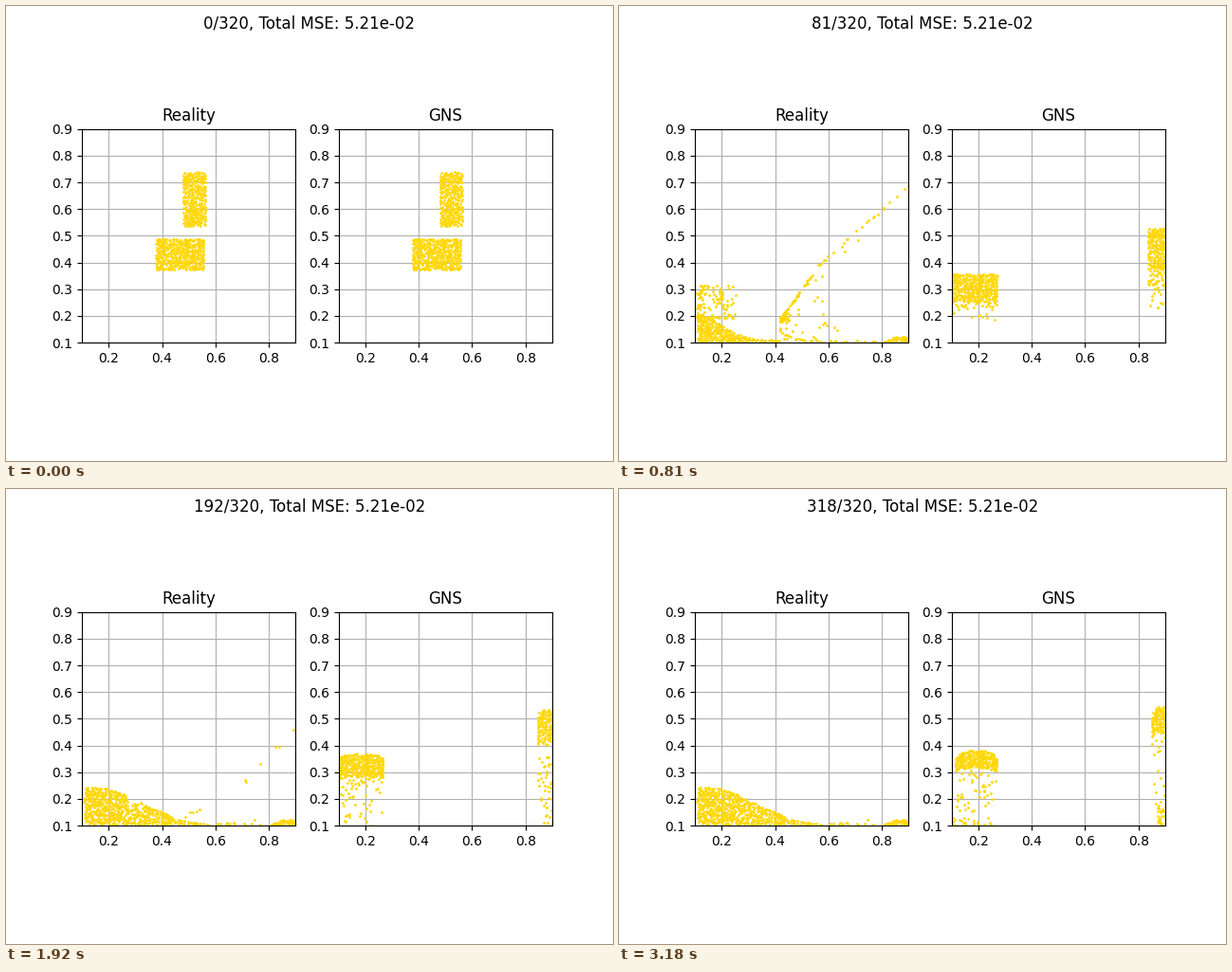
These frames come from a looping animation (640x480 px, 3210 ms). A matplotlib script:

```python
import numpy as np
import matplotlib.pyplot as plt
from matplotlib.animation import FuncAnimation

STEPS, STRIDE, FRAMES = 320, 3, 107
LO, HI = 0.1, 0.9
N_LEFT, N_RIGHT = 320, 245
N_HEAP, N_FLOOR = 32, 30
rng = np.random.default_rng(7)


def ramp(t, a, b):
    return np.clip((t - a) / (b - a), 0, 1)


def ease_out(u):
    return 1 - (1 - u) ** 2


def scatter(n, x0, x1, y0, top, gap=0.0085):
    """Evenly spread random points between y0 and the profile top(x)."""
    peak = top(np.linspace(x0, x1, 50)).max()
    pts = np.empty((n, 2))
    k = 0
    while k < n:
        p = rng.uniform((x0, y0), (x1, peak))
        if p[1] <= top(p[0]) and np.all(((pts[:k] - p) ** 2).sum(1) > gap**2):
            pts[k] = p
            k += 1
        else:
            gap *= 0.9995
    return pts


def block(n, x0, x1, y0, y1):
    return scatter(n, x0, x1, y0, lambda x: y1 + 0 * x)


def by_columns(p, cols=16):
    """Sort points column by column, bottom to top."""
    groups = np.array_split(np.argsort(p[:, 0]), cols)
    return p[np.concatenate([g[np.argsort(p[g, 1])] for g in groups])]


def pile_top(x):
    return LO + 0.145 * np.exp(-(np.maximum(x - LO, 0) / 0.29) ** 2.5)


def splash_top(x):
    return LO + 0.01 + 0.1 * np.exp(-((x - LO) / 0.13) ** 2)


def heap_top(x):
    return 0.124 - 6 * (x - 0.865) ** 2


class Slump:
    """The left block hits its wall, splashes and settles as the pile's base."""

    speed = np.array([-0.0077, -0.0056])
    hit = 36

    def __init__(self, pts, rest):
        self.pts, self.rest = pts, by_columns(rest)
        n_low = int(0.66 * len(pts))
        n_high = len(pts) - n_low
        loose = np.column_stack([0.108 + 0.145 * rng.random(n_high) ** 1.7,
                                 rng.uniform(0.18, 0.315, n_high)])
        low = scatter(n_low, 0.108, 0.42, 0.103, splash_top)
        self.splash = by_columns(np.vstack([low, loose]))

    def at(self, t):
        p = self.pts + self.speed * min(t, self.hit)
        p = p + (self.splash - p) * ramp(t, self.hit, 81)
        return p + (self.rest - p) * ease_out(ramp(t, 81, 130))


class Jet:
    """Grains wait at the right wall, fly back on a straight line and settle."""

    speed = np.array([0.01, -0.0055])

    def __init__(self, pts, slots, n_floor):
        n, m = len(pts), len(slots)
        self.pts = pts
        self.hit = (HI - 0.003 - pts[:, 0]) / self.speed[0]
        # Most leave at once, ever fewer later on.
        self.launch = np.maximum(33 + 160 * rng.random(n) ** 5, self.hit - 6)
        self.launch[m:] = rng.uniform(34, 55, n_floor)
        late = ramp(self.launch, 120, 165)
        stray = (rng.random(n) < 0.45) & (self.launch < 65)
        depth = rng.exponential(np.where(stray, 0.11, 0.006))
        depth[m:] = rng.uniform(0.2, 0.45, n_floor)
        self.slope = 0.873 + 0.127 * late
        self.source = 0.69 - 0.08 * (1 - ramp(self.launch, 33, 48)) - 0.22 * late - depth

        flight = np.arange(0, 80, 0.5)
        x, y = self.path(flight[:, None])
        self.land = flight[np.argmax(y <= pile_top(x), axis=0)]
        self.land_pos = np.column_stack(self.path(self.land))

        # Early grains settle low in the pile.
        self.rest = np.empty((n, 2))
        order = np.argsort((self.launch + self.land)[:m])
        self.rest[order] = slots[np.argsort(slots[:, 1] + rng.normal(0, 0.01, m))]
        self.rest[m:, 0] = rng.uniform(0.47, 0.87, n_floor)
        self.rest[m:, 1] = LO + np.minimum(rng.exponential(0.007, n_floor), 0.02)

    def path(self, s):
        return HI - 0.01 * s, self.source - 0.01 * self.slope * s

    def at(self, t):
        p = self.pts + self.speed * np.minimum(t, self.hit)[:, None]
        wait = ramp(t, self.hit, np.maximum(self.launch, self.hit + 1))
        p[:, 0] += 0.04 * np.minimum(1, (self.launch - 30) / 15) * np.sin(np.pi * wait)
        p[:, 1] += (self.source - p[:, 1]) * wait
        fly = np.column_stack(self.path(np.clip(t - self.launch, 0, self.land)))
        slide = ease_out(ramp(t - self.launch - self.land, 0, 35))
        fly += (self.rest - self.land_pos) * slide[:, None]
        return np.where((t > self.launch)[:, None], fly, p)


class Heap:
    """Grains that drop down along the right wall."""

    def __init__(self, pts):
        self.pts = pts
        self.hit = (HI - 0.003 - pts[:, 0]) / Jet.speed[0]
        self.rest = scatter(len(pts), 0.806, 0.896, 0.1, heap_top, 0.006)

    def at(self, t):
        p = self.pts + Jet.speed * np.minimum(t, self.hit)[:, None]
        drop = ramp(t, self.hit, self.hit + 32)[:, None] ** 1.4
        return p + (self.rest - p) * drop


class Hanger:
    """A block that drifts to a wall, hangs there and sheds grains from below."""

    def __init__(self, pts, shift, tau, drift, squeeze, shed, pace, rest, lift):
        self.pts, self.squeeze, self.lift = pts, squeeze, lift
        self.shift, self.tau, self.drift = map(np.array, (shift, tau, drift))
        self.rest_x, self.rest_y = rest
        low, high = pts.min(0), pts.max(0)
        self.mid = (low[0] + high[0]) / 2
        self.side = 2 * (pts[:, 0] - self.mid) / (high[0] - low[0])
        self.level = (pts[:, 1] - low[1]) / (high[1] - low[1])
        first, span, power = shed
        n = len(pts)
        self.release = first + span * self.level**power + rng.normal(0, 7, n)
        self.pace = pace + rng.exponential(60, n)

    def at(self, t):
        move = self.shift * np.tanh(t / self.tau) + self.drift * t / STEPS
        age = ramp(t, 81, STEPS)
        x, y = (self.pts + move).T
        x = x - self.squeeze * age * (self.pts[:, 0] - self.mid)
        y = y - 0.033 * age * self.side**4 * self.level
        fall = 0.14 * (np.maximum(t - self.release, 0) / self.pace) ** 1.6
        floor = LO + self.rest_y - self.lift * (1 - ramp(t, 200, STEPS))
        x = x + (self.rest_x - x) * np.clip(fall / (y - floor), 0, 1) ** 3
        return np.column_stack([x, np.maximum(y - fall, floor)])


left = by_columns(block(N_LEFT, 0.376, 0.556, 0.372, 0.489))
right = block(N_RIGHT, 0.48, 0.563, 0.536, 0.738)

n_jet = N_RIGHT - N_HEAP
pile = scatter(N_LEFT + n_jet - N_FLOOR, 0.108, 0.56, 0.104, pile_top)
pile = pile[np.argsort(pile[:, 0])]

reality = [Slump(left, pile[:N_LEFT]),
           Jet(right[:n_jet], pile[N_LEFT:], N_FLOOR),
           Heap(right[n_jet:])]
learned = [
    Hanger(left, shift=(-0.298, -0.14), tau=(36, 18), drift=(0.024, 0.033),
           squeeze=0.14, shed=(45, 820, 1.35), pace=60, lift=0.03,
           rest=(0.05 + 0.2 * rng.random(N_LEFT) ** 2,
                 rng.uniform(-0.03, 0.03, N_LEFT))),
    Hanger(right, shift=(0.358, -0.222), tau=(33, 34.5), drift=(0.012, 0.03),
           squeeze=0, shed=(50, 2100, 3), pace=35, lift=0.075,
           rest=(rng.uniform(0.87, 0.94, N_RIGHT),
                 rng.uniform(-0.04, 0.075, N_RIGHT))),
]

fig, axes = plt.subplots(1, 2, figsize=(6.4, 4.8), dpi=100)
title = fig.suptitle("")
dots = []
for ax, name in zip(axes, ("Reality", "GNS")):
    ax.set_title(name)
    ax.set(xlim=(LO, HI), ylim=(LO, HI), aspect="equal")
    ax.grid(True)
    dots += ax.plot([], [], "o", ms=2, color="gold", mew=0)


def update(frame):
    t = frame * STRIDE
    for dot, parts in zip(dots, (reality, learned)):
        dot.set_data(*np.vstack([part.at(t) for part in parts]).T)
    title.set_text(f"{t}/{STEPS}, Total MSE: 5.21e-02")
    return [*dots, title]


anim = FuncAnimation(fig, update, frames=FRAMES, interval=30, repeat=True,
                     repeat_delay=0, blit=False)
plt.show()
```
